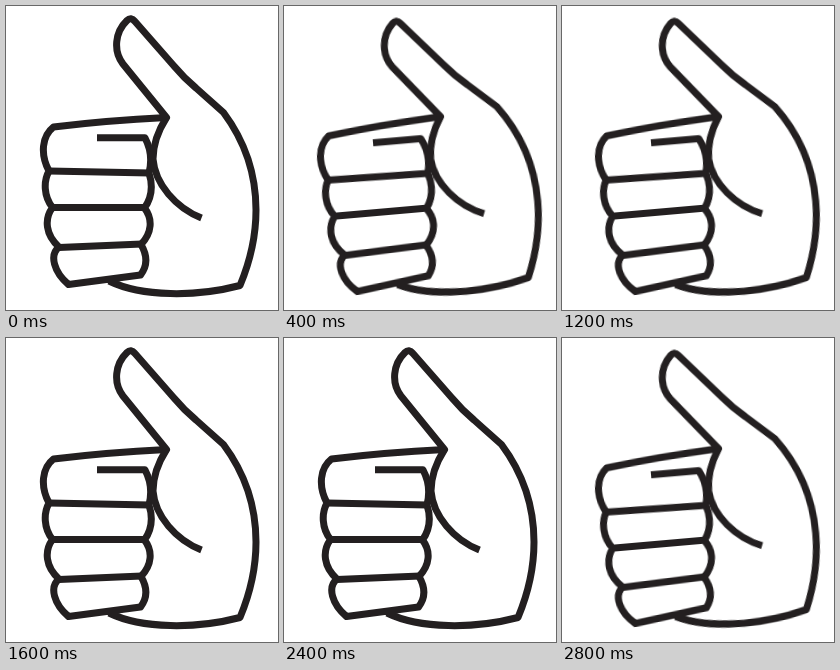
An HTML page that plays this animation: 272x304 px, repeating every 3200 ms.

```html
<!DOCTYPE html>
<html lang="en">
<head>
<meta charset="utf-8">
<title>Thumbs up</title>
<style>
  html, body { margin: 0; width: 100%; height: 100%; overflow: hidden; background: #fff; }
  svg { display: block; width: 100vw; height: 100vh; }
  .hand {
    fill: none;
    stroke: #231f20;
    stroke-width: 7;
    stroke-linejoin: round;
    transform-origin: 148px 157px;
    animation: wag 800ms step-end infinite;
  }
  @keyframes wag {
    0% { transform: rotate(0deg); }
    50% { transform: rotate(-5deg); }
  }
</style>
</head>
<body>
<svg viewBox="0 0 272 304">
  <g class="hand">
    <!-- outline: wrist, back of the hand, thumb, then around the fingers -->
    <path d="M103 275 C136 291 190 291 234 279.500
      C243 258 250 234 250 204 C250 166 238 134 217.500 106.500
      L190 82 Q178 72 168 60 L129 15.500 Q125 10.500 121 14.500
      C109 26 107 45 117 58 L160.500 111.500
      Q100 114.500 47.500 121 C36 130 34 148 43 165
      C37.500 175 37.500 190 46.500 201.500
      C38 213 39.500 229 53 241
      C43 249 48 266 62.500 278.500 L134.500 269
      C143 258 140 247 135 238.500
      C146 227 147 213 138.500 202
      C145.500 192 147.500 181 143 167
      C146 155 145 143 139 131.800 H91"/>
    <!-- crease at the base of the thumb -->
    <path d="M160.500 111.500 C150 128 147 141 147 153 C149 178 170 202 195.500 212"/>
    <!-- gaps between the fingers -->
    <path d="M43 165 L144 167 M46.500 201.500 H139 M53 241.500 L136 238"/>
  </g>
</svg>
</body>
</html>
```
